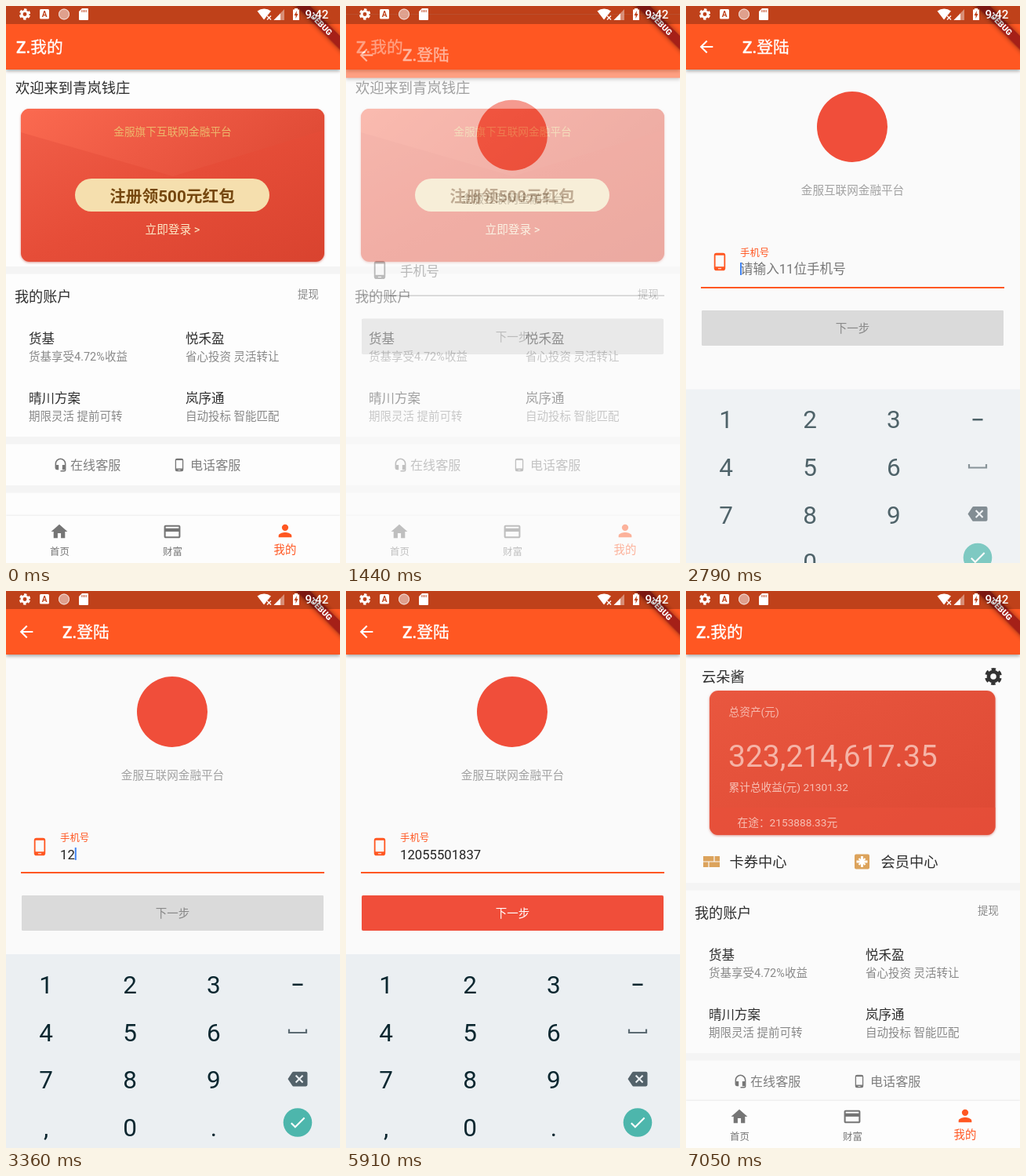
Animation, 426 px wide and 710 px high, one loop 8070 ms. Source, as an HTML page:

```html
<!DOCTYPE html>
<html lang="zh-CN">
<head>
<meta charset="utf-8">
<style>
html, body { margin: 0; width: 100%; height: 100%; overflow: hidden; background: #fdfdfd; }
svg { display: block; width: 426px; height: 710px; }
text { font-family: Roboto, "Noto Sans CJK SC", "Noto Sans CJK", sans-serif; white-space: pre; }
.bar { filter: drop-shadow(0 2px 2px #0005); }
.card { filter: drop-shadow(0 1px 1.5px #c0392b88); }
.raised { filter: drop-shadow(0 .5px .5px #0003); }
.band { filter: drop-shadow(0 0 3px #0008); }
</style>
</head>
<body>
<svg id="stage" viewBox="0 0 426 710">
  <defs>
    <linearGradient id="red" x2="1" y2="1">
      <stop stop-color="#f2604a"/><stop offset=".5" stop-color="#e64d38"/><stop offset="1" stop-color="#d9432f"/>
    </linearGradient>
    <linearGradient id="softRed" x2="1" y2="1">
      <stop stop-color="#e9573f"/><stop offset="1" stop-color="#de4934"/>
    </linearGradient>
    <linearGradient id="flap" x2="1" y2=".25">
      <stop stop-color="#fb6a50"/><stop offset=".5" stop-color="#ee5a44"/><stop offset="1" stop-color="#e14c37"/>
    </linearGradient>
    <clipPath id="envelope"><rect x="19" y="131" width="387" height="195" rx="11"/></clipPath>
  </defs>
</svg>
<script>
const LOOP = 8070;
const ORANGE = '#ff5722', RED = '#f04e3a', GOLD = '#dca35c', DARK = '#2e2e2e', GREY = '#888';
const PHONE = '12055501837';
const KEY_TIMES = [3180, 3360, 3600, 3870, 4110, 4320, 4590, 4800, 5010, 5280, 5520];

const ICONS = {
  home: 'M10 20v-6h4v6h5v-8h3L12 3 2 12h3v8z',
  wallet: 'M20 4H4c-1.1 0-2 .9-2 2v12c0 1.1.9 2 2 2h16c1.1 0 2-.9 2-2V6c0-1.1-.9-2-2-2zm0 14H4v-6h16zm0-10H4V6h16z',
  person: 'M12 12a4 4 0 1 0 0-8 4 4 0 0 0 0 8zm0 2c-2.67 0-8 1.34-8 4v2h16v-2c0-2.66-5.33-4-8-4z',
  back: 'M20 11H7.83l5.59-5.59L12 4l-8 8 8 8 1.41-1.41L7.83 13H20z',
  headset: 'M12 1a9 9 0 0 0-9 9v7a3 3 0 0 0 3 3h3v-8H5v-2a7 7 0 0 1 14 0v2h-4v8h4v1h-7v2h6a3 3 0 0 0 3-3V10a9 9 0 0 0-9-9z',
  phone: 'M16 1H8a3 3 0 0 0-3 3v16a3 3 0 0 0 3 3h8a3 3 0 0 0 3-3V4a3 3 0 0 0-3-3zm-2 20h-4v-1h4zm3.25-3H6.75V4h10.5z',
  erase: 'M22 3H7c-.7 0-1.2.35-1.6.9L0 12l5.4 8.1c.4.55.9.9 1.6.9h15a2 2 0 0 0 2-2V5a2 2 0 0 0-2-2zm-3 12.6L17.6 17 14 13.4 10.4 17 9 15.6l3.6-3.6L9 8.4 10.4 7l3.6 3.6L17.6 7 19 8.4 15.4 12z',
  check: 'M9 16.17L4.83 12l-1.42 1.41L9 19 21 7l-1.41-1.41z'
};

// All helpers place things by their vertical centre.
const text = (x, y, size, fill, str, attrs = '') =>
  `<text x="${x}" y="${y + size * .37}" font-size="${size}" fill="${fill}" ${attrs}>${str}</text>`;
const MID = 'text-anchor="middle"', MEDIUM = 'font-weight="500"';
const rect = (x, y, w, h, fill, attrs = '') =>
  `<rect x="${x}" y="${y}" width="${w}" height="${h}" fill="${fill}" ${attrs}/>`;
const icon = (name, x, y, size, fill, attrs = '') =>
  `<path d="${ICONS[name]}" fill="${fill}" ${attrs} transform="translate(${x} ${y}) scale(${size / 24}) translate(-12 -12)"/>`;
const gear = (x, y, size, color) =>
  `<g transform="translate(${x} ${y}) scale(${size / 24})" fill="none" stroke="${color}">
    <circle r="5.6" stroke-width="4.2"/>
    <circle r="8.6" stroke-width="3" stroke-dasharray="5 4.006" stroke-dashoffset="-2"/></g>`;
const group = (id, body, attrs = '') => `<g id="${id}" ${attrs}>${body}</g>`;
const appBar = (x, title) => rect(0, 0, 426, 81, ORANGE, 'class="bar"') +
  text(x, 52, 20.7, '#fff', title, MEDIUM + ' stroke="#fff" stroke-width=".3"');

function account() {
  const product = (x, y, name, note) =>
    text(x, y, 16.5, DARK, name) + text(x, y + 23, 14.5, GREY, note);
  return [332, 549, 611].map(y => rect(0, y, 426, 9.5, '#f4f4f4')).join('') +
    text(11, 370.4, 18.1, DARK, '我的账户') + text(372, 367, 13.4, GREY, '提现') +
    product(29, 424, '货基', '货基享受4.72%收益') + product(229, 424, '悦禾盈', '省心投资 灵活转让') +
    product(29, 499.5, '晴川方案', '期限灵活 提前可转') + product(229, 499.5, '岚序通', '自动投标 智能匹配') +
    icon('headset', 69.5, 585, 18.5, '#777') + text(82, 585, 16.1, '#808080', '在线客服') +
    icon('phone', 221, 585, 18, '#777') + text(235, 585, 16.1, '#808080', '电话客服');
}

const navBar = () => rect(0, 650, 426, 60, '#fdfdfd', 'style="filter:drop-shadow(0 -1px 1px #0001)"') +
  icon('home', 68, 670, 25, '#757575') + text(68.5, 695, 12.4, '#757575', '首页', MID) +
  icon('wallet', 212, 670, 25, '#757575') + text(212.5, 695, 12.4, '#757575', '财富', MID) +
  icon('person', 356, 669, 25, ORANGE) + text(356, 692.5, 14.4, ORANGE, '我的', MID);

const guestPage = () => rect(0, 0, 426, 710, '#fdfdfd') + appBar(13, 'Z.我的') +
  text(12, 104, 18.3, DARK, '欢迎来到青岚钱庄') +
  `<g class="card">${rect(19, 131, 387, 195, 'url(#red)', 'rx="11"')}</g>
   <path d="M19 131H406V158L213 217L19 161z" fill="url(#flap)" clip-path="url(#envelope)"/>` +
  text(212.5, 160, 13.7, '#edb76c', '金服旗下互联网金融平台', MID) +
  rect(88, 220, 248, 42, '#f5dfae', 'rx="21"') +
  text(212, 242, 20.7, '#75470f', '注册领500元红包', MID + ' font-weight="600"') +
  text(212.5, 285, 14.7, '#fce8c6', '立即登录 &gt;', MID) + account() + navBar();

const memberPage = () => rect(0, 0, 426, 710, '#fbfbfb') + appBar(13, 'Z.我的') +
  text(20, 109, 18.2, DARK, '云朵酱') + gear(392, 109, 26, '#333') +
  `<g class="card">${rect(30, 127, 364.5, 184, 'url(#softRed)', 'rx="11"')}</g>` +
  '<path d="M30 276H394.500V300a11 11 0 0 1-11 11H41a11 11 0 0 1-11-11z" fill="#e9503b" opacity=".6"/>' +
  text(54.5, 154, 13.7, '#f7b9ad', '总资产(元)') +
  text(54, 210, 39, '#f5b3a6', '323,214,617.35') +
  text(54.5, 250, 13.7, '#f7c0b5', '累计总收益(元) 21301.32') +
  text(65.5, 295, 13.7, '#f7c0b5', '在途：2153888.33元') +
  rect(22, 338, 21, 14, GOLD) +
  '<path d="M22 345H43M36 338v7M29 345v7" stroke="#fbfbfb" stroke-width="1.2"/>' +
  rect(215, 335.5, 19, 19, GOLD, 'rx="2"') +
  `<path d="M224.500 338v14M217.500 345h14" stroke="#fff" stroke-width="3"/>
   <path d="M220.500 341l8 8M228.500 341l-8 8" stroke="#fff" stroke-width="2.200"/>` +
  text(55.5, 345, 18.3, DARK, '卡券中心') + text(248.5, 345, 18.3, DARK, '会员中心') +
  `<g transform="translate(0 40)">${account()}</g>` + navBar();

const loginPage = () => rect(0, 0, 426, 710, '#fafafa') + appBar(72, 'Z.登陆') +
  icon('back', 26, 52, 25, '#fff') +
  `<circle cx="212" cy="154" r="45" fill="${RED}"/>` +
  text(212.5, 235, 14.6, '#a2a2a2', '金服互联网金融平台', MID) +
  icon('phone', 43, 326, 24.8, GREY, 'id="fieldIcon"') +
  text(69, 0, 16.6, GREY, '手机号', 'id="label"') +
  text(69, 335, 16.6, '#777', '请输入11位手机号', 'id="hint"') +
  text(69, 335.5, 16.7, '#222', '', 'id="digits"') +
  rect(69, 327, 2, 16, '#4285f4', 'id="cursor"') +
  rect(19, 358, 387, 1, '#999', 'id="underline"') +
  `<g class="raised">${rect(20, 388, 385, 45, '#dadada', 'id="button" rx="2"')}</g>` +
  text(212.5, 410.5, 14.5, GREY, '下一步', MID + ' id="buttonText"');

function keyboard() {
  const keys = ['123', '456', '789', ',0.'].map((row, r) => [...row].map((key, c) =>
    text(51.2 + 106.8 * c, 501.2 + 60.7 * r, 31.5, '#0b2730', key, MID)).join('')).join('');
  return rect(0, 463, 426, 330, '#ebeff2') + keys +
    rect(365.5, 500.5, 13, 2.5, '#0b2730') +
    '<path d="M361 558.500v4.500h22v-4.500" fill="none" stroke="#5b6a72" stroke-width="2.200"/>' +
    icon('erase', 372, 622, 25, '#53626a') +
    '<circle cx="372" cy="677.500" r="18.300" fill="#4db6ac"/>' + icon('check', 372, 677.5, 25, '#fff');
}

const debugBand = () => `<g transform="translate(426 0) rotate(45)">
  ${rect(-55, 27, 110, 12.4, '#961717', 'class="band" opacity=".85"')}
  ${text(0, 33.2, 10.5, '#fff', 'DEBUG', MID + ' font-weight="900"')}</g>`;

const systemBar = () => rect(0, 0, 426, 23, '#000', 'opacity=".25"') +
  gear(24, 10.5, 17, '#fff') + rect(43, 4, 12, 12.5, '#fff', 'rx="1.5"') +
  text(49, 10.5, 10, '#bf411a', 'A', MID + ' font-weight="700"') +
  `<circle cx="74" cy="10.500" r="7" fill="#fff" opacity=".5"/>
   <circle cx="74" cy="10.500" r="6.500" fill="none" stroke="#fff" opacity=".7"/>
   <path d="M97 3h7q1 0 1 1v13q0 1-1 1H94q-1 0-1-1V7z" fill="#fff"/>
   <path d="M97 5v3M99.500 5v3M102 5v3" stroke="#bf411a"/>
   <path d="M329 17.500L320.500 6.500a14 14 0 0 1 17.500 0z" fill="#fff"/>
   <path d="M333 12.500l5 5m0-5l-5 5" stroke="#bf411a" stroke-width="2.600"/>
   <path d="M333 12.500l5 5m0-5l-5 5" stroke="#fff" stroke-width="1.400"/>
   <path d="M341.500 18H355V4z" fill="#fff" opacity=".4"/><path d="M341.500 18H350V9.500z" fill="#fff"/>
   <path d="M368 3h4v1.500h2V18h-8V4.500h2z" fill="#fff"/><path d="M371 6l-3.500 6h2v4l3-6h-2z" fill="#bf411a"/>` +
  text(381.5, 10.5, 15.2, '#fff', '9:42', MEDIUM);

const stage = document.getElementById('stage');
stage.insertAdjacentHTML('beforeend',
  group('guest', guestPage()) + group('member', memberPage()) +
  group('login', loginPage()) + group('keys', keyboard()) + debugBand() + systemBar());
const el = id => document.getElementById(id);
const set = (id, attrs) => Object.entries(attrs).forEach(([k, v]) => el(id).setAttribute(k, v));

const progress = (t, start, length) => Math.min(1, Math.max(0, (t - start) / length));
const mix = (a, b, k) => a + (b - a) * k;
const blend = (a, b, k) => `rgb(${a.map((v, i) => Math.round(mix(v, b[i], k)))})`;

function bezier(x1, y1, x2, y2) {
  const at = (a, b, s) => 3 * a * s * (1 - s) ** 2 + 3 * b * s * s * (1 - s) + s ** 3;
  return x => {
    let lo = 0, hi = 1;
    for (let i = 0; i < 20; i++) {
      const mid = (lo + hi) / 2;
      if (at(x1, x2, mid) < x) lo = mid; else hi = mid;
    }
    return at(y1, y2, lo);
  };
}
const slideCurve = bezier(.4, 0, .2, 1), fadeCurve = bezier(.42, 0, 1, 1);

function draw(t) {
  el('guest').style.display = t < 4000 ? '' : 'none';
  el('member').style.display = t < 4000 ? 'none' : '';

  // Login page rises in, later drops back out along the same curves.
  const shown = progress(t, 1230, 300) - progress(t, 6507, 300);
  set('login', {
    opacity: shown > 0 ? fadeCurve(shown) : 0,
    transform: `translate(0 ${177 * (1 - slideCurve(shown))})`
  });

  const focus = progress(t, 2220, 140);
  const accent = blend([136, 136, 136], [255, 87, 34], focus);
  const labelSize = mix(16.6, 12.4, focus);
  const typed = KEY_TIMES.filter(k => t >= k).length;
  set('fieldIcon', { fill: accent });
  set('label', { fill: accent, 'font-size': labelSize, y: mix(327, 314.5, focus) + labelSize * .37 });
  set('underline', { fill: accent, height: 1 + focus });
  set('hint', { opacity: typed ? 0 : focus });
  el('digits').textContent = PHONE.slice(0, typed);
  const cursorOn = t >= 2250 && (t < 5910 || t >= 6480);
  set('cursor', { x: 69 + 9.38 * typed, opacity: cursorOn ? 1 : 0 });

  const enabled = progress(t, 5510, 190);
  set('button', { fill: blend([218, 218, 218], [240, 78, 58], enabled) });
  set('buttonText', { fill: blend([136, 136, 136], [255, 255, 255], enabled) });

  const rise = progress(t, 2700, 250), leave = progress(t, 6870, 180);
  const up = 1 - (1 - rise) ** 2;
  set('keys', {
    opacity: Math.min(1, up * 1.2) * (1 - leave),
    transform: `translate(0 ${63 * (1 - up) + 63 * leave ** 2})`
  });
}

function tick() {
  draw(performance.now() % LOOP);
  requestAnimationFrame(tick);
}
tick();
</script>
</body>
</html>
```
